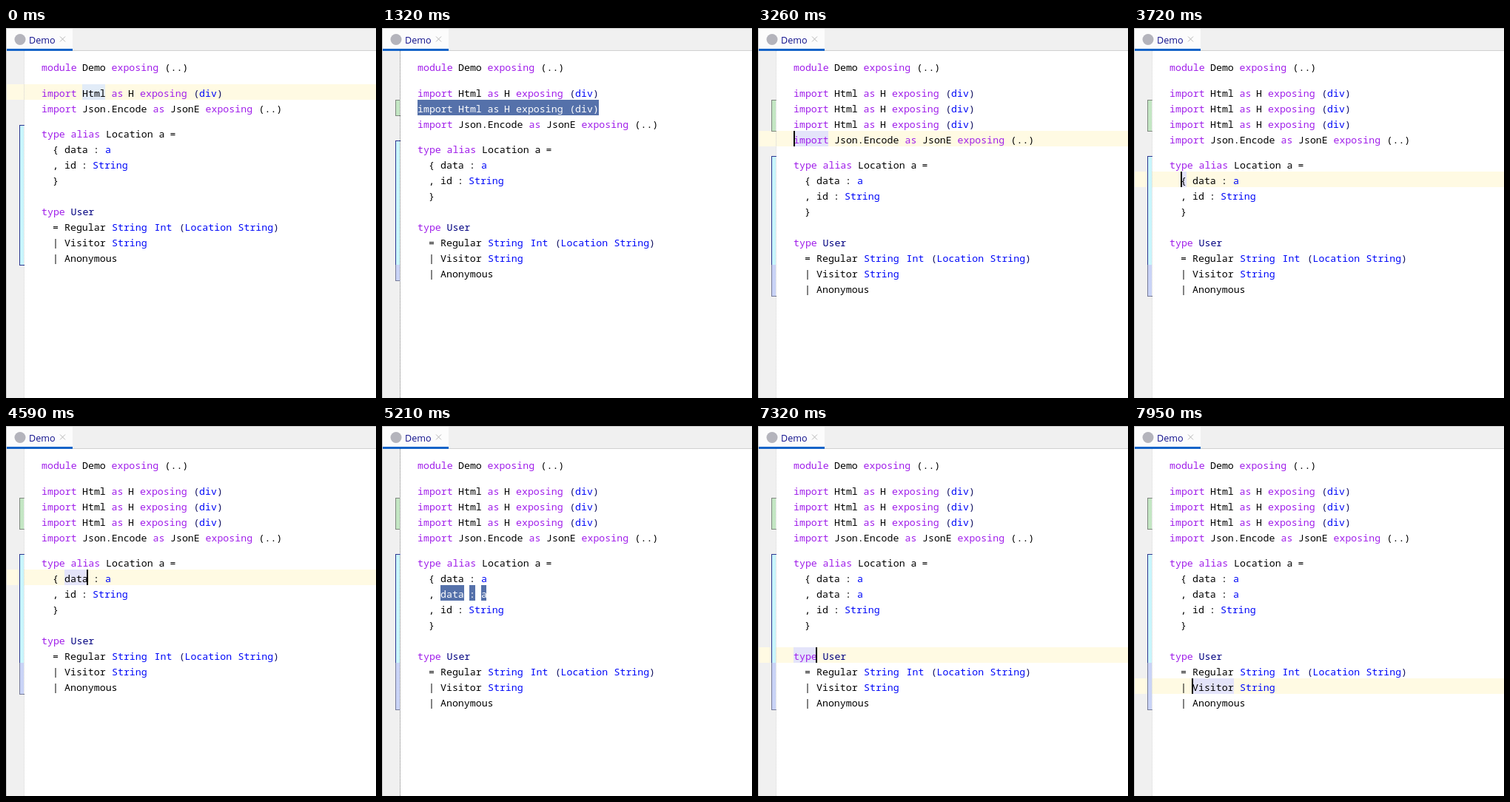
Write an HTML page that moves like this. It is 500x500 px and loops after 8000 ms.

```html
<!DOCTYPE html>
<html lang="en">
<head>
<meta charset="utf-8">
<title>Editor: duplicate lines</title>
<style>
  html, body { margin: 0; width: 100%; height: 100%; overflow: hidden; background: #fff; }
  svg { position: absolute; left: 0; top: 0; width: 500px; height: 500px; display: block; }
  rect { shape-rendering: crispEdges; }
  #code { font: 13.25px "Noto Sans Mono", "DejaVu Sans Mono", monospace; font-variant-ligatures: none; }
  .k { fill: #a01eea; }
  .t { fill: #0008f8; }
  .p { fill: #101060; }
  .n { fill: #000080; }
  .b { fill: #000; }
  .s { fill: #fff; }
</style>
</head>
<body>
<svg viewBox="0 0 500 500">
  <rect width="500" height="500" fill="#fff"/>
  <rect y="31" width="24" height="469" fill="#f0f0f0"/>
  <g id="back"></g>
  <g id="code"></g>
  <g id="front"></g>
  <rect width="500" height="31" fill="#f0f0f0"/>
  <rect y="30" width="500" height="1" fill="#d0d0d0"/>
  <rect width="90" height="28" fill="#fcfcfc"/>
  <rect y="28" width="90" height="3" fill="#1464c8"/>
  <rect width="500" height="1" fill="#c9c9c9"/>
  <rect width="1" height="500" fill="#c9c9c9"/>
  <circle cx="19" cy="15.5" r="7.5" fill="#b4b4bc"/>
  <text x="31" y="21" font-family="Open Sans, Noto Sans, sans-serif" font-size="12.6" fill="#10108c">Demo</text>
  <path d="M73 11.5l7 7m0-7l-7 7" stroke="#b8b8b8" fill="none"/>
</svg>
<script>
const LOOP = 8000, ROW = 21;
const $ = id => document.getElementById(id);

// Each token: colour class, x, text
const IMPORT = 'k48:import b103:Html k142.5:as b165:H k181:exposing p253.5:( t261:div p285:)';
const DATA = 'b79:data b118:: t134:a';
const HEAD = ['k48:module b103:Demo k142.5:exposing b214.5:(..)'];
const JSON_IMPORT = 'k48:import b103:Json.Encode k198.5:as b222:JsonE k269.5:exposing b341.5:(..)';
const ALIAS = 'k48:type k87.5:alias b135:Location b206.5:a b221.5:=';
const ID = 'b63:, b79:id b102:: t117:String';
const USER = [
  'k48:type n87.5:User',
  'b63:= b79:Regular t143:String t200.5:Int p234:( t241.5:Location t313.5:String p361:)',
  'b63:| b79:Visitor t143:String',
  'b63:| b79:Anonymous'
];

// band: caret row; caret: x; hl: word under caret; sel: selected row and its x ranges
const word = (band, caret, from, to, color = '#e4e4fa') => ({ band, caret, hl: [from, to], color });
const html = caret => word(76, caret, 103, 134, '#e2ecf8');
const pick = (y, ...spans) => ({ sel: y, spans });

// Start time, import lines, data fields, view
const steps = [
  [0, 1, 1, html()],
  [150, 1, 1, html(117)],
  [700, 1, 1, html()],
  [1170, 1, 1, html(117)],
  [1320, 2, 1, pick(97, [48, 293])],
  [2180, 3, 1, pick(118, [48, 293])],
  [3260, 3, 1, word(139, 48, 48, 95)],
  [3490, 3, 1, word(173, 48, 48, 79)],
  [3720, 3, 1, word(194, 63, 63, 71)],
  [4040, 3, 1, word(194, 70, 63, 71)],
  [4420, 3, 1, word(194, 78, 79, 111)],
  [4590, 3, 1, word(194, 109, 79, 111)],
  [5210, 3, 2, pick(215, [79, 111], [118, 126], [134, 141])],
  [6920, 3, 2, word(236, 78, 79, 95)],
  [7090, 3, 2, word(257, 70, 63, 71)],
  [7320, 3, 2, word(299, 78, 48, 79)],
  [7620, 3, 2, word(320, 78, 79, 135)],
  [7950, 3, 2, word(341, 78, 79, 135)]
];

const box = (x, y, w, h, fill) =>
  `<rect x="${x}" y="${y}" width="${w}" height="${h}" fill="${fill}"/>`;

function drawLine(line, y, view) {
  return line.split(' ').map(token => {
    const [, kind, x, text] = token.match(/^(\w)([\d.]+):(.+)$/);
    const picked = view.sel === y && x >= view.spans[0][0];
    return `<text class="${picked ? 's' : kind}" x="${x}" y="${y + 17}">${text}</text>`;
  }).join('');
}

// Change marker with an open right side
function marker(top, bottom, fill, edge, caps) {
  let out = box(18, top, 6, bottom - top, fill) + box(18, top, 1, bottom - top, edge);
  if (caps.includes('t')) out += box(18, top, 7, 1, edge);
  if (caps.includes('b')) out += box(18, bottom, 7, 1, edge);
  return out;
}

function draw([, imports, fields, view]) {
  const blocks = [
    [HEAD, 14],
    [[...Array(imports).fill(IMPORT), JSON_IMPORT], 13],
    [[ALIAS, 'b63:{ ' + DATA, ...Array(fields - 1).fill('b63:, ' + DATA), ID, 'b63:}'], ROW],
    [USER, 0]
  ];
  let y = 41, code = '', aliasTop = 0;
  for (const [lines, gap] of blocks) {
    if (lines[0] === ALIAS) aliasTop = y;
    for (const line of lines) {
      code += drawLine(line, y, view);
      y += ROW;
    }
    y += gap;
  }

  let back = '';
  if (view.sel) {
    for (const [from, to] of view.spans) back += box(from, view.sel, to - from, ROW, '#5571aa');
  } else {
    back += box(0, view.band, 500, ROW, '#fffae3');
    back += box(view.hl[0], view.band, view.hl[1] - view.hl[0], ROW, view.color);
  }
  back += `<path d="M24.5 31V500" stroke="${view.sel ? '#777' : '#d2d2d2'}" stroke-dasharray="1 1"/>`;
  back += marker(aliasTop, 320, '#c8f5fc', '#2c3690', y > 320 ? 't' : 'tb');
  if (y > 320) back += marker(320, y, '#c9d3f6', '#777c98', 'b');
  if (imports > 1) back += marker(97, 97 + (imports - 1) * ROW, '#c3e6c3', '#808880', 'tb');

  $('back').innerHTML = back;
  $('code').innerHTML = code;
  $('front').innerHTML = view.caret ? box(view.caret, view.band, 2, ROW, '#000') : '';
}

let shown;
const start = performance.now();
function tick() {
  const t = (performance.now() - start) % LOOP;
  const step = steps.filter(s => s[0] <= t).pop();
  if (step !== shown) draw(shown = step);
  requestAnimationFrame(tick);
}
tick();
</script>
</body>
</html>
```
